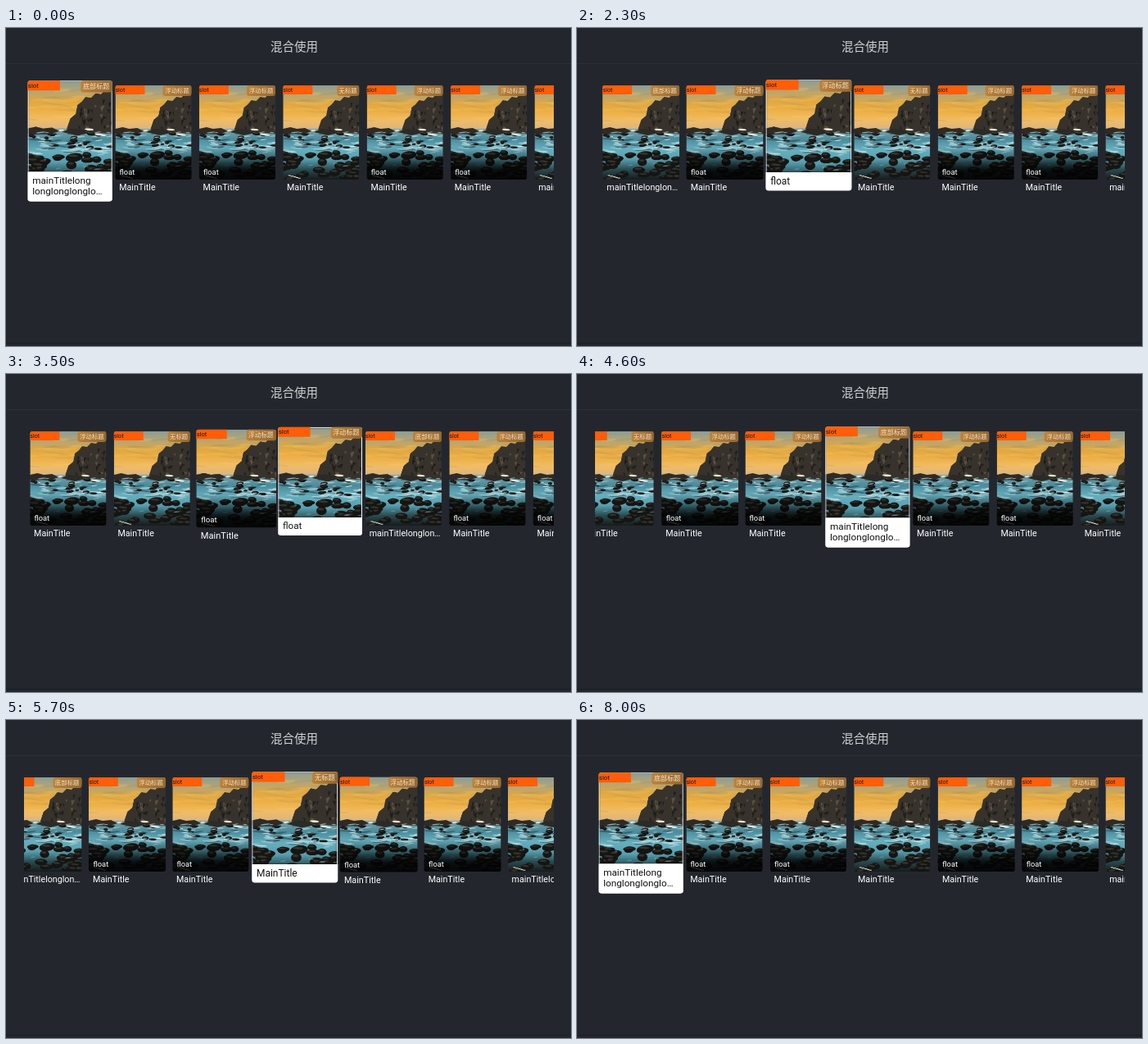
Write an HTML page with a canvas that moves like this. It is 690 px wide and 388 px high and loops after 8.1 s.

```html
<!DOCTYPE html>
<html lang="zh">
<head>
<meta charset="utf-8">
<style>
html, body { margin: 0; width: 100%; height: 100%; overflow: hidden; background: #23272d; }
body { position: relative; font: 10.7px/12.6px Roboto, sans-serif; }
h1 { position: absolute; left: 0; top: 0; width: 704px; height: 43px; margin: 0; text-align: center;
  font: 300 14.5px/44px "Noto Sans CJK SC", sans-serif; color: #d0d2d3; }
.line { position: absolute; left: 0; width: 690px; height: 1px; background: #2d3136; }
#view { position: absolute; left: 21.5px; top: 44px; width: 647px; height: 340px; overflow: hidden; }
.card { position: absolute; left: 0; top: 26px; width: 93.5px; height: 115px; white-space: pre; }
.card > * { position: absolute; }
canvas { left: 0; top: 0; width: 100%; height: 100%; border-radius: 3px; }
.shade { left: 0; right: 0; top: 75px; bottom: 0; border-radius: 3px; background: linear-gradient(#0000, #000c 75%); }
.float { left: 5.6px; top: 99.5px; font-size: 9.3px; color: #fff; }
.title { left: 5.2px; top: 119.4px; color: #fff; }
.panel { left: 0; right: 0; top: 100.8px; padding: 4px 0 3.6px 5.2px; background: #fff; color: #111;
  border-radius: 0 0 3px 3px; display: none; }
.ring { left: 0; top: 0; right: 0; height: 101px; box-sizing: border-box; border: 1px solid #fff;
  border-bottom: 0; border-radius: 3px 3px 0 0; box-shadow: inset 0 0 0 .6px #0008; display: none; }
.slot { left: 0; top: .4px; width: 36px; height: 10.4px; background: #ff5d08; border-radius: 3px 0 0 0;
  font-size: 7.2px; line-height: 11px; color: #1d1712; text-indent: .4px; }
.tag { right: 0; top: .4px; padding: 0 2.6px; background: linear-gradient(90deg, #bd8238, #96672f);
  border-radius: 3px; font: 7.4px/12.6px "Noto Sans CJK SC", sans-serif; color: #f1e2cb; }
.on { z-index: 1; }
.on .panel, .on .ring { display: block; }
.on .shade, .on .float, .on .title { display: none; }
</style>
</head>
<body>
<h1>混合使用</h1>
<div class="line" style="top:43px"></div>
<div id="view"></div>
<div class="line" style="top:384px;background:#1b1f24"></div>
<script>
const W = 93.5, H = 115, STEP = 102.4, LEFT = 30.6 - 21.5, LOOP = 8100;
const view = document.getElementById('view');

// Seaside at dusk: sky, headland, foamy water, dark boulders
function paint(c) {
  let seed = 7;
  const rnd = (a = 0, b = 1) => {
    seed = (seed * 16807) % 2147483647;
    return a + (b - a) * seed / 2147483647;
  };
  const fade = (y0, y1, colors) => {
    const g = c.createLinearGradient(0, y0, 0, y1);
    colors.forEach((col, i) => g.addColorStop(i / (colors.length - 1), col));
    c.fillStyle = g;
    c.fillRect(0, y0, W, y1 - y0);
  };
  const poly = (col, ...p) => {
    c.fillStyle = col;
    c.beginPath();
    for (let i = 0; i < p.length; i += 2) c.lineTo(p[i], p[i + 1]);
    c.fill();
  };
  const blob = (col, x, y, rx, ry) => {
    c.fillStyle = col;
    c.beginPath();
    c.ellipse(x, y, rx, ry, rnd(-.15, .15), 0, 7);
    c.fill();
  };
  const rock = (x, y, rx, ry) => {
    blob('#151513', x, y, rx, ry);
    blob('#34332c', x - rx * .15, y - ry * .4, rx * .6, ry * .3);
  };

  fade(0, 54, ['#8d9d92', '#b3a578', '#dfa743', '#eeb045', '#f0bd67', '#d9b483']);
  for (let i = 0; i < 22; i++)
    blob(i % 2 ? '#f8cb6a38' : '#8c8c7030', rnd(0, W), rnd(4, 46), rnd(8, 22), rnd(.6, 1.8));
  fade(53, H, ['#82a4a6', '#4b8c9c', '#68aebd', '#57a0b0', '#2b4b50', '#171c1c']);

  poly('#37332c', 43, 54, 47, 42, 53, 37, 55, 27, 60, 23, 64, 18, 70, 19, 75, 14, 81, 15, 85, 11, W, 9, W, 59, 66, 57);
  for (let i = 0; i < 26; i++) {
    const x = rnd(55, 92), y = rnd(30 - (x - 55) * .35, 52);
    poly(i % 3 ? '#1f1e1b' : '#5c5140', x, y, x + rnd(2, 5), y + rnd(-2, 2), x + rnd(0, 3), y + rnd(3, 7));
  }
  poly('#2d2b27', 0, 53, 9, 51, 17, 53, 27, 52, 35, 56, 26, 59, 0, 60);
  poly('#2b2a26', 38, 57, 47, 53, 60, 54, 68, 58, 55, 61);

  for (let i = 0; i < 55; i++)
    blob(i % 3 ? '#b9dfe2b0' : '#2c4f58b0', rnd(0, W), rnd(56, 83), rnd(2, 9), rnd(.4, 1.1));
  for (let i = 0; i < 20; i++) rock(rnd(0, W), rnd(59, 76), rnd(2, 6), rnd(.8, 2));
  blob('#fff4df', 68, 54, 5, 1.1);
  blob('#f7eee0', 37, 55, 3, .8);
  blob('#eaf3f0', 80, 60, 6, 1);
  for (let i = 0; i < 16; i++) blob('#e8f2f0c0', rnd(0, W), rnd(61, 80), rnd(1.5, 5), rnd(.3, .8));

  for (let i = 0; i < 40; i++) {
    const y = 82 + i * .85;
    rock(rnd(-2, W + 2), y + rnd(-2, 2), rnd(5, 10), rnd(2.6, 5));
  }
  for (let i = 0; i < 10; i++) blob('#6ca2aa90', rnd(0, W), rnd(80, 100), rnd(1, 4), rnd(.4, .9));
  for (let i = 0; i < 5; i++) blob('#cfd5c4', 8 + i * 3, 110 + i * .8, 1.8, .6);
}

function makeCard(i) {
  const kind = i % 6, long = kind === 0, bare = kind === 3, float = !long && !bare;
  const tag = long ? '底部标题' : bare ? '无标题' : '浮动标题';
  const title = long ? 'mainTitlelonglon…' : 'MainTitle';
  const focused = long ? 'mainTitlelong\nlonglonglonglo…' : float ? 'float' : title;
  const el = document.createElement('div');
  el.className = 'card';
  el.innerHTML = `<canvas width="${W * 2}" height="${H * 2}"></canvas>` +
    (float ? '<div class="shade"></div><div class="float">float</div>' : '') +
    `<div class="title">${title}</div><div class="panel">${focused}</div>` +
    `<div class="ring"></div><div class="slot">slot</div><div class="tag">${tag}</div>`;
  const c = el.firstChild.getContext('2d');
  c.scale(2, 2);
  paint(c);
  view.append(el);
  return el;
}
const cards = Array.from({ length: 10 }, (_, i) => makeCard(i));

// Focus walks right to card 6, then back to card 0
const moves = [{ at: -1000, to: 0 }];
for (let i = 1; i <= 6; i++) moves.push({ at: 1575 + (i - 1) * 453, to: i });
for (let i = 1; i <= 6; i++) moves.push({ at: 4635 + (i - 1) * 430, to: 6 - i });

const decel = p => 1 - (1 - Math.min(p, 1)) ** 2;
const back = p => {
  const u = Math.min(p, 1) - 1;
  return 1 + 3.5 * u ** 3 + 2.5 * u * u;
};
const scrollFor = i => Math.max(0, i * STEP - 276.8);

function draw(t) {
  const k = moves.findLastIndex(m => m.at <= t);
  const { at, to } = moves[k], from = k ? moves[k - 1].to : to, dt = t - at;
  const start = scrollFor(from);
  const scroll = start + (scrollFor(to) - start) * decel(dt / 240);
  cards.forEach((el, i) => {
    const grow = i === to ? back(dt / 450) : i === from ? 1 - decel(dt / 300) : 0;
    el.classList.toggle('on', i === to);
    el.style.transform = `translateX(${LEFT + i * STEP - scroll}px) scale(${1 + grow * .1})`;
  });
}

const t0 = performance.now();
function tick() {
  const t = (performance.now() - t0) % LOOP;
  draw(Math.floor(t / 100) * 100);
  requestAnimationFrame(tick);
}
tick();
</script>
</body>
</html>
```
